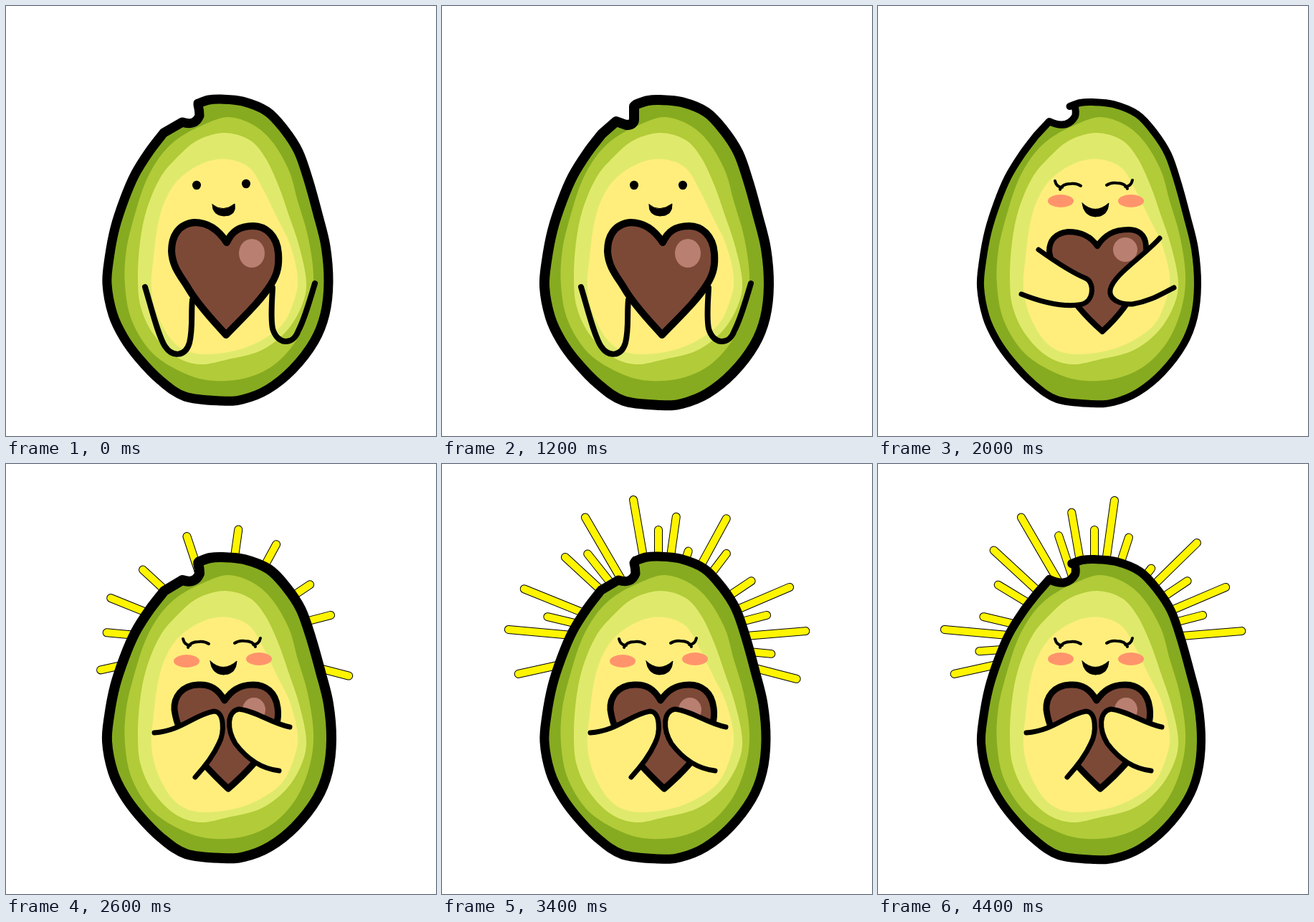
An HTML page with a canvas for the animation above (4500 ms loop, 600x600 px).

```html
<!DOCTYPE html>
<html lang="en">
<head>
<meta charset="utf-8">
<title>Avocado hug</title>
<style>
  html, body { margin: 0; height: 100%; overflow: hidden; background: #fff; }
  canvas { display: block; width: 100%; height: 100%; }
</style>
</head>
<body>
<canvas width="600" height="600"></canvas>
<script>
const ctx = document.querySelector('canvas').getContext('2d');
const YELLOW = '#ffee7c', BROWN = '#7d4937';

const points = s => s.split(' ').map(p => p.split(',').map(Number));

// Smooth path through points
function curve(pts, closed) {
  const n = pts.length;
  const at = i => closed ? pts[(i + n) % n] : pts[Math.max(0, Math.min(n - 1, i))];
  let d = 'M' + pts[0];
  for (let i = 0; i < (closed ? n : n - 1); i++) {
    const [a, b, c, e] = [at(i - 1), at(i), at(i + 1), at(i + 2)];
    const c1 = b.map((v, j) => v + (c[j] - a[j]) / 6);
    const c2 = c.map((v, j) => v - (e[j] - b[j]) / 6);
    d += `C${c1} ${c2} ${c}`;
  }
  return d + (closed ? 'Z' : '');
}

const lerp = (a, b, k) => a + (b - a) * k;
const ramp = (t, a, b) => Math.max(0, Math.min(1, (t - a) / (b - a)));

// Blend two paths with the same commands
function mix(a, b, k) {
  const nums = b.match(/[\d.]+/g);
  let i = 0;
  return a.replace(/[\d.]+/g, v => lerp(+v, +nums[i++], k));
}

function shape(d, fill, width) {
  const p = new Path2D(d);
  if (fill) { ctx.fillStyle = fill; ctx.fill(p); }
  if (width) { ctx.strokeStyle = '#000'; ctx.lineWidth = width; ctx.stroke(p); }
}

function oval(x, y, rx, ry, fill) {
  ctx.beginPath();
  ctx.ellipse(x, y, rx, ry, 0, 0, 7);
  ctx.fillStyle = fill;
  ctx.fill();
}

const body = points('268,136 283,131 300,130 330,133 364,147 388,172 408,203 422,243 435,290 446,335 450,385 445,430 430,468 400,507 365,535 330,549 300,551 250,545 215,522 185,491 164,462 149,430 141,388 144,352 152,310 165,270 180,235 200,203 220,177');

const rings = [
  ['#b2cb38', '310,155 345,166 372,190 395,230 407,272 421,320 429,375 424,420 406,465 375,500 335,519 290,523 250,513 205,485 176,440 166,390 168,340 180,290 195,245 215,210 240,185 275,166'],
  ['#dfea6c', '305,177 340,187 362,212 380,250 394,290 409,335 419,385 412,420 390,455 355,481 310,493 270,500 235,488 205,457 188,420 184,380 187,330 196,285 215,240 240,210 268,187'],
  [YELLOW, '310,214 340,226 360,258 378,295 396,332 407,378 402,410 385,445 350,470 310,483 265,485 235,470 213,435 203,395 206,350 213,300 225,265 245,238 278,218']
].map(([color, s]) => [color, curve(points(s), true)]);

// Outline drawings: left, top, right, bottom, line width, bite
const biteSmall = 'L246 162Q264 168 270 153Q270 146 268 138';
const biteWide = 'L239 161Q264 173 275 154Q277 148 274 138';
const outlines = {
  A: [141, 130, 450, 551, 13, biteSmall],
  B: [143, 131, 456, 557, 14, 'L243 161L257 166Q268 166 268 158L268 140'],
  C: [143, 134, 446, 555, 10, biteWide],
  D: [141, 130, 454, 550, 14, biteSmall],
  E: [143, 129, 452, 551, 13, biteSmall],
  F: [144, 133, 451, 552, 12, biteWide]
};
for (const k in outlines) {
  const [l, t, r, b, width, bite] = outlines[k];
  const fit = body.map(([x, y]) => [lerp(l, r, (x - 141) / 309), lerp(t, b, (y - 130) / 421)]);
  outlines[k] = { d: curve(fit) + bite + 'Z', width };
}
const order = 'ABEABEBABEEABABEABDECEDCEFDCEFDEFDEFDEFDEFDEF';

// Poses: arms down, hugging, clasped
const hearts = [
  'M308 330C295 310 280 302 263 302C240 304 231 322 231 342C232 365 245 378 255 395C270 420 292 442 307 459C330 435 355 412 370 388C380 372 381 360 380 345C378 320 362 307 345 307C325 307 315 315 308 330Z',
  'M306 335C296 320 282 315 265 315C247 317 239 328 239 342C241 358 248 372 257 387C271 413 295 438 313 454C335 434 352 412 364 386C373 368 376 352 374 335C373 318 362 312 350 312C328 312 316 320 306 335Z',
  'M305 330C296 314 285 307 268 308C245 309 234 325 235 343C238 365 246 378 256 392C270 415 294 438 310 453C332 434 354 412 367 388C378 368 381 355 379 340C376 318 362 308 345 308C325 308 314 317 305 330Z'
];
const leftArms = [
  'M194 392C202 418 212 460 222 475C232 490 250 490 256 470C261 450 258 430 260 410',
  'M200 402C225 412 255 420 280 417C302 415 303 386 290 380C270 372 238 350 224 340',
  'M264 437C275 425 288 410 297 390C305 375 305 345 290 345C262 350 245 372 207 375'
];
const rightArms = [
  'M431 387C424 410 417 436 408 453C400 475 378 472 372 450C369 435 371 415 372 393',
  'M413 393C395 402 380 412 355 416C335 417 322 408 324 396C328 375 370 350 393 324',
  'M381 428C355 425 335 410 320 390C308 370 308 345 325 342C350 345 370 362 396 367'
];

// Rays: angle from upright, then reach at each stage (0 = tucked in)
const rays = [
  [-102.4, 174, 200, 200], [-94, 0, 0, 161], [-84.8, 162, 210, 210],
  [-76.6, 0, 159, 159], [-68, 168, 202, 0], [-58.8, 0, 0, 157],
  [-47.3, 151, 177, 191], [-38.4, 0, 159, 0], [-30.2, 0, 203, 203],
  [-18.4, 157, 0, 158], [-9.9, 0, 203, 185], [0, 0, 158, 158],
  [8, 160, 178, 201], [18, 0, 135, 155], [28.6, 157, 198, 0],
  [37.2, 0, 157, 131], [45.6, 0, 0, 200], [56.2, 147, 156, 156],
  [66.9, 0, 199, 199], [75.5, 156, 156, 156], [85.3, 0, 206, 206],
  [95.4, 0, 158, 0], [104.5, 182, 199, 0]
];

function drawRays(t) {
  const grow = [ramp(t, 2200, 2600), ramp(t, 2600, 3000), ramp(t, 3400, 4400)];
  for (const [deg, ...reach] of rays) {
    let r = 90;
    reach.forEach((v, i) => r = lerp(r, Math.max(v, 90), grow[i]));
    const a = deg * Math.PI / 180;
    ctx.beginPath();
    ctx.moveTo(302 + 80 * Math.sin(a), 250 - 80 * Math.cos(a));
    ctx.lineTo(302 + r * Math.sin(a), 250 - r * Math.cos(a));
    for (const [color, width] of [['#000', 12], ['#fff500', 10]]) {
      ctx.strokeStyle = color;
      ctx.lineWidth = width;
      ctx.stroke();
    }
  }
}

function drawFace(t, drawing) {
  if (t < 1700) {
    const shift = drawing === 'B' ? 2 : 0;
    oval(266 + shift, 250, 6, 6.3, '#000');
    oval(335 + shift / 2, 248 + shift, 6, 6.3, '#000');
    shape(`M${288 + shift / 2} 277Q303 289 ${319 + shift} 276Q322 293 304 293Q288 292 ${288 + shift / 2} 277Z`, '#000', 1);
    return;
  }
  const soft = drawing === 'F' || drawing === 'C';
  oval(soft ? 255 : 252, soft ? 272 : 275, 18, 9, '#ff946c');
  oval(353, 272, 18, 9, '#ff946c');
  const eye = new Path2D('M247 244Q249 253 257 253M254 256Q257 248 269 248Q277 247 283 251');
  ctx.strokeStyle = '#000';
  ctx.lineWidth = 4;
  ctx.stroke(eye);
  ctx.save();
  ctx.translate(602, -1);
  ctx.scale(-1, 1);
  ctx.stroke(eye);
  ctx.restore();
  shape('M285 275Q303 292 322 275Q321 294 303 294Q287 293 285 275Z', '#000', 1);
}

function draw(t) {
  let step = Math.floor(t / 100);
  t = step * 100;
  const drawing = order[step], line = outlines[drawing];
  const hug = ramp(t, 1400, 2000), clasp = ramp(t, 2200, 2500);
  const pose = set => mix(mix(set[0], set[1], hug), set[2], clasp);
  const blend = (a, b, c) => lerp(lerp(a, b, hug), c, clasp);

  ctx.fillStyle = '#fff';
  ctx.fillRect(0, 0, 600, 600);
  ctx.lineCap = ctx.lineJoin = 'round';

  if (t > 2200) drawRays(t);
  shape(line.d, '#86ab20');
  for (const [color, d] of rings) shape(d, color);
  shape(line.d, null, line.width);
  drawFace(t, drawing);

  const drawHeart = () => {
    const d = pose(hearts);
    shape(d, BROWN);
    oval(blend(343, 345, 346), blend(345, 340, 343), blend(18, 17, 16), blend(20, 17, 17), '#b97f70');
    shape(d, null, blend(10, 8, 9));
  };
  const drawArms = () => {
    for (const set of [leftArms, rightArms]) {
      const d = pose(set);
      ctx.save();
      ctx.clip(new Path2D(rings[2][1]));
      shape(d, YELLOW);
      ctx.restore();
      shape(d, null, blend(8, 7, 7));
    }
  };
  if (hug < 0.5) { drawArms(); drawHeart(); }
  else { drawHeart(); drawArms(); }
}

function tick() {
  draw(performance.now() % 4500);
  requestAnimationFrame(tick);
}
tick();
</script>
</body>
</html>
```
